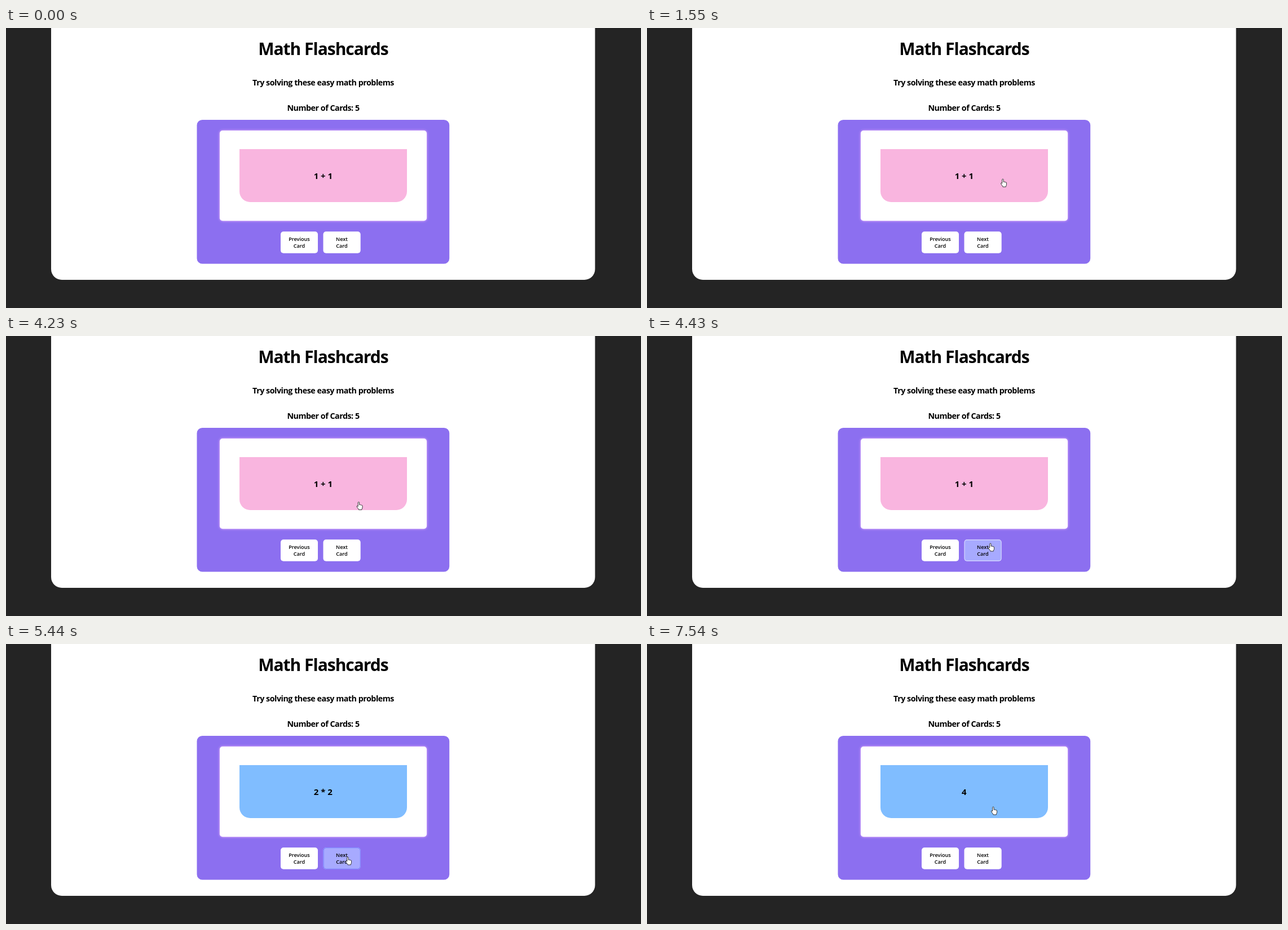
An HTML page that plays this animation: 1126x497 px, repeating every 8000 ms.

```html
<!DOCTYPE html>
<html lang="en">
<head>
<meta charset="utf-8">
<title>Math Flashcards</title>
<style>
  html, body { margin: 0; width: 100%; height: 100%; overflow: hidden; background: #242424; }
  svg { display: block; width: 1126px; height: 497px; }
  text { font-family: "Open Sans", "Noto Sans", sans-serif; font-weight: 700; text-anchor: middle; }
  .head { letter-spacing: -.034em; font-size: 14.3px; }
  .head.big { font-size: 30px; }
  #label { font-size: 15px; }
  .button text { font-size: 9.1px; font-weight: 600; }
  .glow { filter: drop-shadow(0 0 2px #f0b4ff); }
  .pointer { fill: #fff; stroke: #222; stroke-width: .9; stroke-linejoin: round; }
</style>
</head>
<body>
<svg viewBox="0 0 1126 497">
  <rect x="80" y="-40" width="964.5" height="487" rx="19" fill="#fff"/>
  <text class="head big" x="562.5" y="48">Math Flashcards</text>
  <text class="head" x="562.5" y="102">Try solving these easy math problems</text>
  <text class="head" x="562.5" y="146.5">Number of Cards: 5</text>

  <rect x="338.5" y="163" width="447.7" height="255.5" rx="9.5" fill="#8c6ff0"/>
  <rect class="glow" x="379" y="182" width="367" height="160.3" rx="5" fill="#fff"/>
  <path id="card" d="M414 215H711V290a19 19 0 0 1-19 19H433a19 19 0 0 1-19-19z"/>
  <text id="label" x="562.4" y="268.3"></text>

  <g class="button">
    <rect x="487" y="361.3" width="66" height="38.4" rx="5" fill="#fff"/>
    <text x="520" y="377.7">Previous</text>
    <text x="520" y="390.2">Card</text>
  </g>
  <g class="button">
    <rect x="562.5" y="361.3" width="66.2" height="38.4" rx="5" fill="#fff"/>
    <rect id="hover" x="563.6" y="362.4" width="64" height="36.2" rx="4" fill="#a7aaff"/>
    <rect id="border" x="563.1" y="361.9" width="65" height="37.2" rx="4.5" fill="none" stroke="#646cff" stroke-width="1.2"/>
    <text x="595.5" y="377.7">Next</text>
    <text x="595.5" y="390.2">Card</text>
  </g>

  <g id="cursor">
    <path id="arrow" class="pointer" d="M0 0V11.5L2.7 9l1.8 4.2 1.8-.8L4.6 8.3H8.2z"/>
    <path id="hand" class="pointer" d="M-1.3 8V1.3a1.2 1.2 0 0 1 2.4 0V5.2q1.1-.8 1.9.2 1.2-.6 1.8.4 1.7-.3 1.7 1.4v2.6q0 1.8-1.2 3.2v1h-5.4v-.8q-1.6-1.8-3.2-4.6-.6-1.5.6-1.6.8 0 1.4 1z"/>
    <circle id="click" r="9" fill="#ebe132" opacity=".65"/>
  </g>
</svg>
<script>
const LOOP = 8000, TICK = 70, FADE = 250;
const PINK = '#f9b5df', BLUE = '#80bdff';
const HOVER_IN = 4360, HOVER_OUT = 7180;

// [time, label, colour]; each change after the first follows a click
const cards = [
  [0, '1 + 1', PINK], [2020, '2', PINK], [3570, '1 + 1', PINK],
  [5440, '2 * 2', BLUE], [7540, '4', BLUE]
];

const linear = u => u;
const smooth = u => u * u * (3 - 2 * u);
const easeOut = u => 1 - (1 - u) ** 2;

// [first step, last step, x, y, easing]
const moves = [
  [460, 600, 748, 211, linear],
  [930, 1550, 631, 268, smooth],
  [3230, 3430, 631, 270, linear],
  [4230, 4430, 609, 368, linear],
  [4500, 4970, 606, 377, easeOut],
  [5040, 5040, 606, 378, linear],
  [6780, 6780, 606, 378.6, linear],
  [7110, 7400, 614, 289, linear]
];

const el = id => document.getElementById(id);
const [card, label, hover, border, cursor, arrow, hand, click] =
  ['card', 'label', 'hover', 'border', 'cursor', 'arrow', 'hand', 'click'].map(el);
const show = (node, on) => node.setAttribute('visibility', on ? 'visible' : 'hidden');
const clamp = u => Math.max(0, Math.min(1, u));

function cursorAt(t) {
  let x = 1086, y = 458;
  for (const [start, end, toX, toY, ease] of moves) {
    if (t < start) break;
    const count = Math.round((end - start) / TICK);
    const step = count ? Math.min(count, Math.floor((t - start) * count / (end - start) + .01)) : 0;
    const u = ease((step + 1) / (count + 1));
    x += (toX - x) * u;
    y += (toY - y) * u;
  }
  return [x, y];
}

function draw(t) {
  const [, text, colour] = cards.findLast(([start]) => t >= start);
  label.textContent = text;
  card.setAttribute('fill', colour);

  const hovered = t >= HOVER_IN + TICK && t < HOVER_OUT;
  show(hover, hovered);
  border.setAttribute('opacity', clamp(Math.min((t - HOVER_IN) / FADE, 1 - (t - HOVER_OUT) / FADE)));

  const [x, y] = cursorAt(t);
  const overCard = x > 414 && x < 711 && y > 215 && y < 309;
  const visible = t >= moves[0][0];
  cursor.setAttribute('transform', `translate(${x} ${y})`);
  show(hand, visible && (overCard || hovered));
  show(arrow, visible && !overCard && !hovered);
  show(click, cards.some(([start]) => t >= start - TICK && t < start));
}

const began = performance.now();
function frame() {
  draw((performance.now() - began) % LOOP);
  requestAnimationFrame(frame);
}
frame();
</script>
</body>
</html>
```
